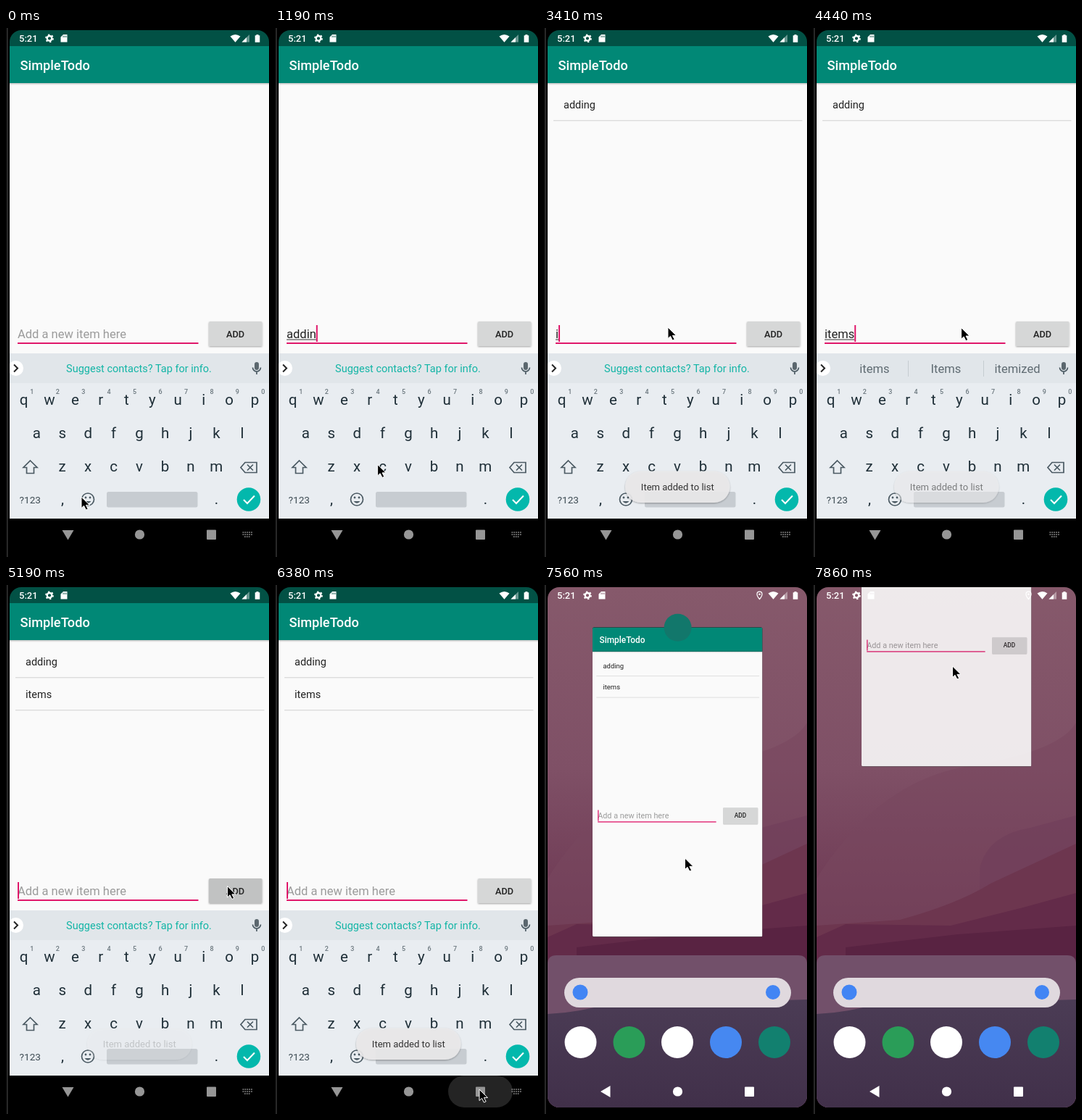
An HTML page for the animation above (8000 ms loop, 363 px wide and 730 px high).

```html
<!DOCTYPE html>
<html lang="en">
<head>
<meta charset="utf-8">
<title>SimpleTodo</title>
<style>
html, body { margin: 0; width: 100%; height: 100%; overflow: hidden; background: #000; }
svg { display: block; width: 363px; height: 730px; font-family: Roboto, "Open Sans", sans-serif; }
.mid { text-anchor: middle; }
.medium { font-weight: 500; }
.field { font-size: 16.55px; }
.row { font-size: 14.5px; fill: #222; }
.key { font-size: 20.5px; fill: #1f2f38; }
.digit { font-size: 9px; font-weight: 500; fill: #6b777e; }
.word { font-size: 16.6px; fill: #5f6b72; }
.line { fill: none; stroke: #4b5a63; stroke-width: 1.7; }
</style>
</head>
<body>
<svg viewBox="0 0 363 730">
  <defs>
    <clipPath id="screenClip"><rect x="5" y="3" width="358" height="718" rx="16"/></clipPath>
    <clipPath id="cardClip"><rect id="crop" x="5" y="3" width="358" height="718"/></clipPath>
    <linearGradient id="sky" x1="0" y1="0" x2="0" y2="1">
      <stop offset="0" stop-color="#86596b"/>
      <stop offset=".35" stop-color="#7f5066"/>
      <stop offset=".7" stop-color="#69334f"/>
    </linearGradient>
    <linearGradient id="ground" x1="0" y1="0" x2="0" y2="1">
      <stop offset="0" stop-color="#4b3c55"/>
      <stop offset="1" stop-color="#41304a"/>
    </linearGradient>
    <linearGradient id="barShade" x1="0" y1="0" x2="0" y2="1">
      <stop offset="0" stop-opacity=".22"/>
      <stop offset="1" stop-opacity="0"/>
    </linearGradient>
    <filter id="soft" x="-20%" y="-30%" width="140%" height="180%">
      <feDropShadow dx="0" dy="1" stdDeviation="1.2" flood-opacity=".35"/>
    </filter>
  </defs>

  <rect width="363" height="730"/>
  <rect x="1" width="1.5" height="730" fill="#353535"/>

  <g clip-path="url(#screenClip)">
    <g id="home">
      <rect x="5" y="3" width="358" height="718" fill="url(#sky)"/>
      <path d="M5 405Q90 270 215 250T363 190V520H5Z" fill="#794860" opacity=".55"/>
      <path d="M230 392Q240 345 300 335L363 318V420H230Z" fill="#713f5b" opacity=".6"/>
      <path d="M5 470L120 462Q200 440 245 412L363 357V520H5Z" fill="#6d364f"/>
      <path d="M5 486L45 468L190 470L290 445L363 425V520H5Z" fill="#632b49"/>
      <path d="M45 500L200 482L363 470V520H45Z" fill="#592342"/>
      <path d="M5 523Q5 511 17 511H351Q363 511 363 523V721H5Z" fill="#72506a"/>
      <path d="M5 592Q50 590 90 577Q150 570 200 578Q260 580 300 574L363 572V721H5Z" fill="url(#ground)"/>
      <rect x="28" y="542" width="313" height="41" rx="20.5" fill="#e0d9de"/>
      <g id="discs"></g>
    </g>

    <g id="app">
      <g clip-path="url(#cardClip)">
        <rect x="5" y="3" width="358" height="718"/>
        <rect x="5" y="3" width="358" height="22" fill="#025145"/>
        <rect x="5" y="76" width="358" height="601" fill="#fafafa"/>
        <rect x="5" y="25" width="358" height="51" fill="#018876"/>
        <rect x="5" y="76" width="358" height="3" fill="url(#barShade)"/>
        <text x="19.5" y="58" class="medium" font-size="18.2" fill="#fff">SimpleTodo</text>
        <g id="rows"></g>
        <text id="hint" x="16" y="427.5" class="field" fill="#9b9b9b">Add a new item here</text>
        <text id="typed" x="16" y="427.5" class="field" fill="#212121"></text>
        <rect id="under" x="16" y="429.5" height="1" fill="#333"/>
        <rect x="16" y="434" width="249.5" height="2" fill="#e0176a"/>
        <rect id="caret" y="410" width="2" height="23" fill="#e0176a"/>
        <rect id="button" x="280" y="405" width="73.5" height="34" rx="1.5" filter="url(#soft)"/>
        <text x="316.5" y="426.5" class="mid medium" font-size="12.8" fill="#222">ADD</text>
      </g>
      <circle id="badge" cx="184.6" cy="25.5" r="29" fill="#12776b"/>
    </g>

    <g id="keyboard">
      <rect x="5" y="449" width="358" height="228" fill="#e9edf1"/>
      <rect x="5" y="449" width="358" height="41" fill="#e1e6ea"/>
      <circle cx="13.5" cy="469.5" r="10.5" fill="#fff"/>
      <path d="M11 464.5L16 469.5L11 474.5" class="line" style="stroke:#222;stroke-width:2"/>
      <text id="tip" x="183.5" y="475" class="mid" font-size="14.5" fill="#13b5a6">Suggest contacts? Tap for info.</text>
      <g id="words">
        <path d="M131.5 459V481M235.5 459V481" stroke="#c5ccd1"/>
        <text x="85" y="476" class="word mid"></text>
        <text x="183.5" y="476" class="word mid"></text>
        <text x="282" y="476" class="word mid"></text>
      </g>
      <rect x="343" y="461" width="6" height="11" rx="3" fill="#5b676e"/>
      <path d="M340.5 468.5a5.5 5.5 0 0 0 11 0M346 474V478" class="line"/>
      <g id="keys"></g>
      <path d="M33.5 597L43 606.5H38.5V614.5H28.5V606.5H24Z" class="line"/>
      <path d="M330 599.5H346V613.5H330L324 606.5ZM333 602.5L341 610.5M341 602.5L333 610.5" class="line"/>
      <text x="33.3" y="656" class="mid" font-size="13.6" fill="#3c4a52">?123</text>
      <text x="78" y="657" class="key mid">,</text>
      <text x="290.5" y="657" class="key mid">.</text>
      <circle cx="113" cy="650.5" r="8.5" class="line"/>
      <path d="M108.5 653Q113 658.5 117.5 653Z" fill="#4b5a63"/>
      <circle cx="110" cy="648" r="1.4" fill="#4b5a63"/>
      <circle cx="116" cy="648" r="1.4" fill="#4b5a63"/>
      <rect x="139" y="640" width="125.5" height="21.5" rx="2.5" fill="#c7ccd1"/>
      <circle cx="335" cy="650.5" r="16.3" fill="#03b8ac"/>
      <path d="M328 651L333 656L343 645.5" fill="none" stroke="#fff" stroke-width="2"/>
    </g>

    <g fill="#fff">
      <text x="18" y="19" class="medium" font-size="13">5:21</text>
      <circle cx="60" cy="14.3" r="3.3" fill="none" stroke="#fff" stroke-width="2.4"/>
      <circle cx="60" cy="14.3" r="5" fill="none" stroke="#fff" stroke-width="1.8" stroke-dasharray="2.3 2.936"/>
      <path d="M79 9H84.5V19.5H75.5V12.5ZM78.600 10.500V13H79.400V10.500ZM80.600 10.500V13H81.400V10.500ZM82.600 10.500V13H83.400V10.500Z" fill-rule="evenodd"/>
      <g id="place">
        <path d="M297.5 19.500Q294 15.500 294 12.700A3.500 3.500 0 0 1 301 12.700Q301 15.500 297.5 19.500Z" fill="none" stroke="#fff" stroke-width="1.2"/>
        <circle cx="297.5" cy="12.700" r="1.300"/>
      </g>
      <path d="M309.5 11.5Q316.5 6.5 323.5 11.5L316.5 19.8Z"/>
      <path d="M336 9V19.5H325.5Z" opacity=".4"/>
      <path d="M332 13V19.5H325.5Z"/>
      <path d="M345.5 9H348.5V10.2H350.3V19.7H343.7V10.2H345.5Z"/>
    </g>

    <rect id="ripple" x="239" y="677" width="89" height="44" rx="22" fill="#fff"/>
    <g id="nav">
      <path id="back" d="M77.5 693H93.5L85.5 706.5Z"/>
      <circle cx="184.5" cy="699" r="6.6"/>
      <rect x="277" y="692.5" width="13" height="13.5" rx="1"/>
      <path id="imeIcon" d="M326.5 696H340M326.5 699H340M329 702H337.5" fill="none" stroke="#8c8c8c" stroke-width="1.7" stroke-dasharray="1.8 1.1"/>
    </g>
  </g>

  <g id="toast">
    <rect x="112" y="611.5" width="144.5" height="43.5" rx="21.7" fill="#ebeaeb" fill-opacity=".9" filter="url(#soft)"/>
    <text x="184.3" y="638" class="mid" font-size="13.05" fill="#333">Item added to list</text>
  </g>
  <path id="mouse" d="M0 0V15.5L3.5 12.3L6.4 18L9.2 16.7L6.4 11.4H11.5Z" stroke="#fff"/>
</svg>
<script>
const $ = id => document.getElementById(id);
const LOOP = 8000, STEP = 148.2;

// Fixed parts
const discs = [[50, 562, 10.5, '#4285f4'], [316, 562, 10, '#4285f4'], [50.5, 631, 22, '#fff'],
  [117.5, 631, 22, '#2a9d58'], [184, 631, 22, '#fff'], [251, 631, 22, '#4688f1'], [318, 631, 22, '#12806f']];
$('discs').innerHTML = discs.map(([x, y, r, c]) => `<circle cx="${x}" cy="${y}" r="${r}" fill="${c}"/>`).join('');

const keyRows = [['qwertyuiop', 24.5, 520], ['asdfghjkl', 42.3, 566], ['zxcvbnm', 77.6, 612]];
$('keys').innerHTML = keyRows.map(([keys, x0, y], row) => [...keys].map((k, i) => {
  const x = x0 + 35.45 * i;
  const digit = row ? '' : `<text x="${x + 11.3}" y="505" class="digit mid">${(i + 1) % 10}</text>`;
  return `<text x="${x}" y="${y}" class="key mid">${k}</text>` + digit;
}).join('')).join('');

$('rows').innerHTML = ['adding', 'items'].map((s, i) =>
  `<g><text x="27" y="${111 + 45 * i}" class="row">${s}</text>
   <rect x="13" y="${127 + 45 * i}" width="343.5" height="1.4" fill="#dcdcdc"/></g>`).join('');

// Tracks: [step, value...]
const mouse = [[0, 104, 647], [7, 104, 647], [12, 292, 424], [13, 298.5, 415], [15, 298.5, 415], [19, 288, 414],
  [21, 288, 414], [22, 220, 413], [23, 171, 413], [29, 171, 413], [33, 305.5, 415.5], [36, 305.5, 415.5],
  [42, 282, 696], [44, 282, 696], [45, 237.5, 677], [50, 194.5, 377], [51, 194.5, 377], [53, 192.5, 112]];
const typing = [[0, ''], [1, 'a'], [3, 'ad'], [5, 'add'], [6, 'addi'], [8, 'addin'], [9, 'adding'], [16, ''],
  [22, 'i'], [24, 'it'], [25, 'ite'], [27, 'item'], [28, 'items'], [34, '']];
const suggestions = [[0, ''], [10, 'adding,Addington,I adding'], [16, ''], [25, 'ite,item,items'],
  [28, 'items,Items,itemized'], [34, '']];
const buttonFill = [[0, '#d6d7d7'], [14, '#c8c9c9'], [15, '#b6b7b7'], [16, '#c6c7c7'], [17, '#d6d7d7'],
  [33, '#c8c9c9'], [34, '#b6b7b7'], [35, '#c1c2c2'], [36, '#d6d7d7']];
const toast = [[16, 0], [17, .3], [18, .8], [19, 1], [29, 1], [30, .6], [31, .2], [32, 0],
  [34, 0], [35, .22], [36, .95], [37, 1], [47, 1], [48, .5], [49, 0]];
const shrink = [[44, 0], [45, .654], [46, .84], [47, .95], [48, 1]];
const drag = [[51, 0], [52, -97], [53, -235]];
const fade = [[51, 1], [53, .9]];
const badge = [[48, 0], [51, 1]];
const ripple = [[42, 0], [43, .14], [44, .14], [45, .05], [46, 0]];

const held = (track, n) => track.filter(k => k[0] <= n).pop()[1];

function at(track, n, col = 1) {
  if (n <= track[0][0]) return track[0][col];
  const i = track.findIndex(k => k[0] >= n);
  if (i < 0) return track[track.length - 1][col];
  const a = track[i - 1], b = track[i];
  return a[col] + (b[col] - a[col]) * (n - a[0]) / (b[0] - a[0]);
}

const set = (id, attrs) => Object.entries(attrs).forEach(([k, v]) => $(id).setAttribute(k, v));
const show = (node, on) => { node.style.display = on ? '' : 'none'; };

function drawField(n) {
  const text = held(typing, n);
  $('typed').textContent = text;
  const width = text ? $('typed').getComputedTextLength() : 0;
  show($('hint'), !text);
  set('under', { width });
  set('caret', { x: 16 + width });
  show($('caret'), n > 0);
  set('button', { fill: held(buttonFill, n) });

  const words = held(suggestions, n);
  show($('tip'), !words);
  show($('words'), words);
  $('words').querySelectorAll('text').forEach((el, i) => el.textContent = words.split(',')[i] || '');
}

function drawCard(n) {
  const p = at(shrink, n), s = 1 - .345 * p;
  const x = 5 + 62 * p - 5 * s, y = 42 * p + at(drag, n);
  set('app', { transform: `translate(${x} ${y}) scale(${s})`, opacity: at(fade, n) });
  set('crop', { y: 3 + 22 * p, height: 718 - 66 * p, rx: p === 1 ? 3 : 0 });
  set('badge', { opacity: at(badge, n) });
}

function draw(n) {
  drawField(n);
  drawCard(n);
  [...$('rows').children].forEach((row, i) => show(row, n >= [16, 34][i]));
  show($('home'), n > 44);
  show($('keyboard'), n < 44);
  show($('place'), n >= 50);
  show($('imeIcon'), n < 44);
  set('nav', { fill: n > 44 ? '#fff' : '#969696' });
  set('back', { transform: n < 44 ? '' : 'rotate(90 85.5 699)' });
  set('ripple', { opacity: at(ripple, n) });
  set('toast', { opacity: at(toast, n) });
  set('mouse', { transform: `translate(${at(mouse, n)} ${at(mouse, n, 2)})` });
}

const start = performance.now();
let shown = -1;
function tick() {
  const t = (performance.now() - start) % LOOP;
  const n = Math.min(53, Math.floor((t + 10) / STEP));
  if (n !== shown) draw(shown = n);
  requestAnimationFrame(tick);
}
tick();
</script>
</body>
</html>
```
